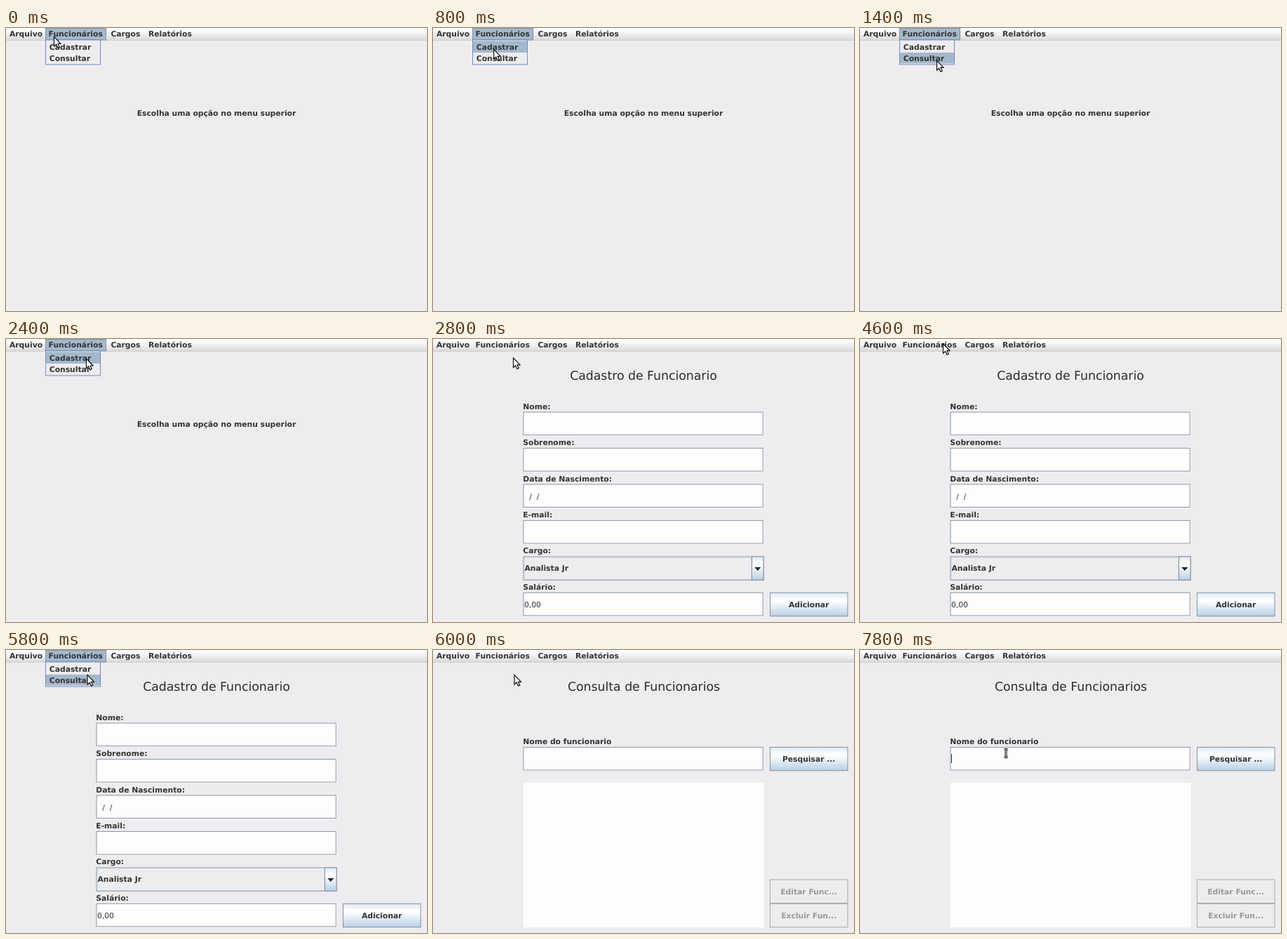
Write an HTML page that moves like this. It is 600 px wide and 403 px high and loops after 8000 ms.

```html
<!DOCTYPE html>
<html lang="pt">
<head>
<meta charset="utf-8">
<title>Cadastro de funcionários</title>
<style>
  html, body { margin: 0; width: 100%; height: 100%; overflow: hidden; background: #eeecee; }
  svg { display: block; width: 100%; height: 100%; }
  text { font: 10.75px "DejaVu Sans", sans-serif; fill: #333; white-space: pre; text-rendering: geometricPrecision; }
  .bold { font-weight: bold; }
  .title { font-size: 17.3px; text-anchor: middle; fill: #2b2b2b; }
  .mid { text-anchor: middle; }
  .off { fill: #999; }
</style>
</head>
<body>
<svg id="stage" viewBox="0 0 600 403">
  <defs>
    <linearGradient id="bar" x2="0" y2="1">
      <stop stop-color="#fff"/><stop offset=".3" stop-color="#f8f8f8"/><stop offset="1" stop-color="#dadada"/>
    </linearGradient>
    <linearGradient id="steel" x2="0" y2="1">
      <stop stop-color="#dde8f3"/><stop offset=".3" stop-color="#fff"/>
      <stop offset=".45" stop-color="#f4f8fb"/><stop offset="1" stop-color="#b8cfe5"/>
    </linearGradient>
  </defs>
</svg>
<script>
const LOOP = 8000, STEP = 200;
const EDGE = '#7a8a99', BLUE = '#6382bf', SELECTED = '#a3b8cc', PANEL = '#eeecee', PAPER = '#fefdfe';

const box = (x, y, w, h, fill, stroke = 'none', extra = '') =>
  `<rect x="${x}" y="${y}" width="${w}" height="${h}" fill="${fill}" stroke="${stroke}" stroke-width=".9" ${extra}/>`;
const text = (x, y, s, cls = 'bold') => `<text x="${x}" y="${y}" class="${cls}">${s}</text>`;
const group = (id, ...parts) => `<g id="${id}">${parts.join('')}</g>`;
// Sunken field: dark edge with a pale line outside its right and bottom
const field = y => box(128.6, y, 342.8, 34.2, PAPER) + box(129, y + .4, 341.2, 32.6, PAPER, EDGE);
const button = (y, label, enabled = true) =>
  box(480.4, y + .4, 110.6, 33.4, enabled ? 'url(#steel)' : PANEL, enabled ? EDGE : '#a0a0a2') +
  text(535.7, y + 21, label, enabled ? 'bold mid' : 'bold mid off');

const labels = ['Nome:', 'Sobrenome:', 'Data de Nascimento:', 'E-mail:', 'Cargo:', 'Salário:'];
const rowY = i => 103.7 + i * 51.43;
const formRows = labels.map((label, i) =>
  text(128.3, rowY(i) - 4, label) + (i === 4 ? '' : field(rowY(i))));
const combo =
  box(129, 310, 342, 33.2, PANEL, EDGE) +
  box(129.9, 310.9, 324, 31.4, 'none', '#b8cfe5') +
  box(454.5, 310, 16.5, 33.2, 'url(#steel)', EDGE) +
  '<path d="M458.3 325h9l-4.5 5z" fill="#222"/>' +
  text(130.5, 330, 'Analista Jr');

const beam = 'M-2.5-5.5h1.7l.8.8.8-.8h1.7M0-4.7V4.7M-2.5 5.5h1.7l.8-.8.8.8h1.7';

document.getElementById('stage').innerHTML += [
  box(0, 0, 600, 403, PANEL),
  group('home', text(300, 125, 'Escolha uma opção no menu superior', 'bold mid')),
  group('form', text(300, 58, 'Cadastro de Funcionario', 'title'), ...formRows, combo,
    text(130.5, 227.5, '  /  /', ''), text(130, 382, '0,00', ''), button(360.9, 'Adicionar')),
  group('search', text(300.5, 58, 'Consulta de Funcionarios', 'title'),
    text(128.3, 134, 'Nome do funcionario'), field(138), button(138, 'Pesquisar ...'),
    box(128.6, 189.4, 342.8, 205.7, PAPER),
    button(326.6, 'Editar Func...', false), button(360.9, 'Excluir Fun...', false),
    box(130, 148, 1, 13, '#333', 'none', 'id="caret"')),
  box(0, 0, 600, 17.2, 'url(#bar)'),
  box(0, 17.1, 600, .9, '#ccc'),
  group('popup',
    box(56.5, .5, 86, 16.5, SELECTED, EDGE),
    box(56.5, 17, 78, 35, PANEL, BLUE),
    box(57, 18.5, 77, 16.5, SELECTED, 'none', 'id="item0"'),
    box(57, 35, 77, 15.5, SELECTED, 'none', 'id="item1"'),
    text(61.8, 31, 'Cadastrar'), text(61.8, 47, 'Consultar')),
  text(5, 12, 'Arquivo'), text(60.6, 12, 'Funcionários'),
  text(149.4, 12, 'Cargos'), text(203, 12, 'Relatórios'),
  group('pointer',
    group('arrow', '<path d="M.5.5V14.2L3.6 11.3 5.9 16.3 8.2 15.2 6 10.4H10z" fill="#fff" stroke="#111" stroke-width="1.2"/>'),
    group('beam', `<path d="${beam}" fill="none" stroke="#111" stroke-width="3"/>`,
      `<path d="${beam}" fill="none" stroke="#fff" stroke-width=".9"/>`))
].join('');

// time, x, y of the pointer tip
const path = [
  [0, 68, 12], [600, 82, 27], [1400, 109, 46], [2200, 114, 28], [2800, 114, 26.5],
  [3400, 114, 26.5], [4200, 118, 7], [4800, 118, 6], [5400, 116, 28], [5800, 115.5, 35],
  [6200, 115.5, 35], [7200, 208, 147], [LOOP, 208, 147]
];

function pointerAt(t) {
  const i = path.findIndex(p => p[0] > t);
  const [t0, x0, y0] = path[i - 1], [t1, x1, y1] = path[i];
  const k = (t - t0) / (t1 - t0), e = k * k * (3 - 2 * k);
  return [x0 + (x1 - x0) * e, y0 + (y1 - y0) * e];
}

const $ = id => document.getElementById(id);
const show = (id, on) => { $(id).style.display = on ? '' : 'none'; };

function draw(now) {
  const t = Math.floor((now % LOOP) / STEP) * STEP;
  const [x, y] = pointerAt(t);
  const inField = t >= 6000 && x > 128 && y > 138;
  show('home', t < 2800);
  show('form', t >= 2800 && t < 6000);
  show('search', t >= 6000);
  show('popup', t < 2800 || (t >= 4800 && t < 6000));
  show('item0', y >= 18.5 && y < 35);
  show('item1', y >= 35 && y < 52);
  show('caret', t >= 7800);
  show('arrow', !inField);
  show('beam', inField);
  $('pointer').setAttribute('transform', `translate(${x} ${y})`);
}

const start = performance.now();
function tick() {
  draw(performance.now() - start);
  requestAnimationFrame(tick);
}
tick();
</script>
</body>
</html>
```
